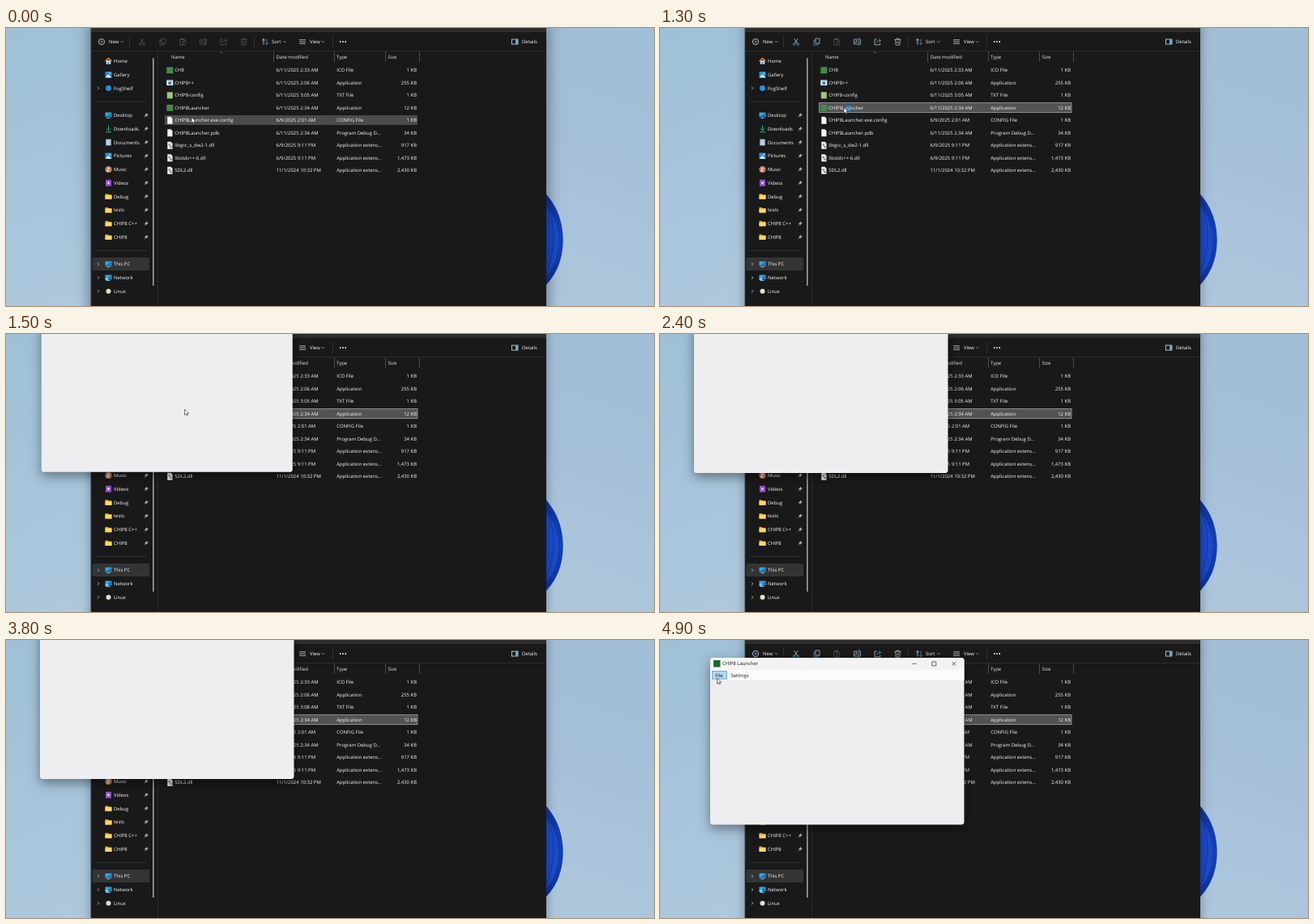
An HTML page with a canvas that plays this animation: 800 by 344 pixels, repeating every 5 s.

```html
<!DOCTYPE html>
<html lang="en">
<head>
<meta charset="utf-8">
<title>File list and launcher</title>
<style>
html, body { margin: 0; width: 100%; height: 100%; overflow: hidden; background: #a8c5d9; }
canvas { display: block; }
</style>
</head>
<body>
<canvas id="stage" width="800" height="344"></canvas>
<script>
const c = document.getElementById('stage').getContext('2d');
const LOOP = 5000, STEP = 100;
const LIGHT = '#fafafa', DIM = '#5c5c5c', BLUE = '#4cb4ec', CHROME = '#191919';

const files = [
  ['CH8', '6/11/2025 2:33 AM', 'ICO File', '1 KB', 'chip'],
  ['CHIP8++', '6/11/2025 2:06 AM', 'Application', '255 KB', 'app'],
  ['CHIP8-config', '6/11/2025 3:05 AM', 'TXT File', '1 KB', 'note'],
  ['CHIP8Launcher', '6/11/2025 2:34 AM', 'Application', '12 KB', 'chip'],
  ['CHIP8Launcher.exe.config', '6/9/2025 2:01 AM', 'CONFIG File', '1 KB', 'page'],
  ['CHIP8Launcher.pdb', '6/11/2025 2:34 AM', 'Program Debug D...', '34 KB', 'page'],
  ['libgcc_s_dw2-1.dll', '6/9/2025 9:11 PM', 'Application extens...', '917 KB', 'dll'],
  ['libstdc++-6.dll', '6/9/2025 9:11 PM', 'Application extens...', '1,473 KB', 'dll'],
  ['SDL2.dll', '11/1/2024 10:32 PM', 'Application extens...', '2,430 KB', 'dll']
];

// An empty label is a separator line.
const places = [
  ['Home', 'home'], ['Gallery', 'picture'], ['FogShelf', 'cloud'], [''],
  ['Desktop', 'desktop'], ['Downloads', 'download'], ['Documents', 'document'],
  ['Pictures', 'picture'], ['Music', 'music'], ['Videos', 'video'],
  ['Debug', 'folder'], ['tests', 'folder'], ['CHIP8 C++', 'folder'], ['CHIP8', 'folder'], [''],
  ['This PC', 'pc'], ['Network', 'network'], ['Linux', 'linux']
];

function rect(x, y, w, h, color, r = 0) {
  c.fillStyle = color;
  c.beginPath();
  c.roundRect(x, y, w, h, r);
  c.fill();
}
function frame(x, y, w, h, color, width = 0.7) {
  c.strokeStyle = color;
  c.lineWidth = width;
  c.strokeRect(x, y, w, h);
}
function dot(x, y, r, color) {
  c.fillStyle = color;
  c.beginPath();
  c.arc(x, y, r, 0, 7);
  c.fill();
}
function at(x, y, draw) {
  c.save();
  c.translate(x, y);
  draw();
  c.restore();
}
function line(d, color, width = 0.7) {
  c.strokeStyle = color;
  c.lineWidth = width;
  c.stroke(new Path2D(d));
}
function shape(d, color) {
  c.fillStyle = color;
  c.fill(new Path2D(d));
}
function text(s, x, y, color = LIGHT, align = 'left') {
  c.fillStyle = color;
  c.textAlign = align;
  c.fillText(s, x, y + 2.1);
}
function withShadow(blur, dy, alpha, draw) {
  c.save();
  c.shadowColor = `rgba(0,0,0,${alpha})`;
  c.shadowBlur = blur;
  c.shadowOffsetY = dy;
  draw();
  c.restore();
}
function gradient(x0, y0, x1, y1, ...colors) {
  const g = c.createLinearGradient(x0, y0, x1, y1);
  colors.forEach((color, i) => g.addColorStop(i / (colors.length - 1), color));
  return g;
}
const ease = p => p * p * (3 - 2 * p);
const clamp = v => Math.max(0, Math.min(1, v));

function follow(keys, t) {
  const i = keys.findIndex(k => k[0] > t);
  if (i < 0) return keys[keys.length - 1].slice(1);
  const [a, b] = [keys[i - 1], keys[i]];
  const p = (t - a[0]) / (b[0] - a[0]);
  return [a[1] + (b[1] - a[1]) * p, a[2] + (b[2] - a[2]) * p];
}

const page = () => {
  shape('M-3-4.5H1.2L3.2-2.5V4.5H-3Z', '#f4f4f4');
  shape('M1.2-4.5V-2.5H3.2Z', '#b5b5b5');
};
const monitor = () => {
  rect(-4, -3.4, 8, 5.6, '#35a6de', 0.6);
  shape('M-4 2.2L4-3.4V2.2Z', '#1c78bd');
  rect(-2, 3, 4, 0.9, '#a9c3d2');
};
const icons = {
  chip: () => rect(-4, -4, 8, 8, '#438a4b'),
  note: () => rect(-3.5, -4, 7, 8, '#9cc978'),
  cloud: () => dot(0, 0, 3.4, '#2391e0'),
  linux: () => dot(0, 0, 3, '#e4dfcd'),
  page,
  app() {
    rect(-4, -3.3, 8, 6.6, '#f2f5f8', 0.5);
    rect(-4, -3.3, 8, 1.3, '#9db9cc');
    rect(-2, -1.3, 4, 3.4, '#1f7fc9');
  },
  dll() {
    page();
    line('M-1.3-1.6h1.6v1.6h-1.6ZM.4 1h1.6v1.6H.4Z', '#77797c', 0.9);
  },
  home() {
    rect(-2.8, -0.8, 5.6, 4.6, '#d9dee3', 0.4);
    rect(-0.8, 1, 1.6, 2.8, '#2787cc');
    line('M-4 0L0-3.6L4 0', '#f08a45', 1.3);
  },
  picture() {
    rect(-4, -3.7, 8, 7.4, '#2b8edb', 0.8);
    shape('M-4 3.5L-.2-.4L4 3.7Z', '#d5efff');
    dot(1.8, -1.8, 0.8, '#fff');
  },
  desktop: monitor,
  pc: monitor,
  download: () => line('M0-4V2M-2.6-.4L0 2.2L2.6-.4M-3.5 4H3.5', '#26b57c', 1),
  document() {
    rect(-3.3, -4, 6.6, 8, '#9fb7cc', 0.6);
    line('M-1.8-1.6H1.8M-1.8.2H1.8M-1.8 2H1.8', '#f5f9fc', 0.8);
  },
  music() {
    dot(0, 0, 4, '#c9805f');
    line('M-.3 1.7V-2L1.6-1.3', '#fff', 0.8);
    dot(-1, 1.6, 0.9, '#fff');
  },
  video() {
    rect(-3.5, -4, 7, 8, '#9650d2', 0.8);
    shape('M-1-1.7L1.8 0L-1 1.7Z', '#fff');
  },
  folder() {
    shape('M-4-3.2H-.8L.2-2.2H4V3.2H-4Z', '#e9a928');
    rect(-4, -1.4, 8, 4.7, '#ffd667', 0.5);
  },
  network() {
    monitor();
    dot(-2, 1.8, 2, '#67cdf4');
  }
};

const chevron = (x, y, color = '#bdbdbd') => at(x, y, () => line('M-1.6-.8L0 .8L1.6-.8', color));

function background() {
  rect(0, 0, 400, 344, gradient(0, 0, 130, 344, '#9fc0d6', '#a6c4da', '#afc9de'));
  rect(400, 0, 400, 344, gradient(800, 0, 680, 344, '#a0bed6', '#a6c0d9', '#adc8dc'));
  shape('M660 199C679 215 688 239 687.700 264C687 289 679 307 660 325Z',
    gradient(660, 205, 688, 320, '#0d339c', '#1340b5', '#0d319d'));
  shape('M660 212C674 226 683 244 682 266C681 287 674 302 660 314Z', '#1b4bcb');
  line('M666 217C677 237 681 264 667 304', '#1039a6', 1);
}

function toolbar(active) {
  const ink = active ? '#d2d2d2' : DIM, accent = active ? BLUE : DIM;
  rect(105, 0, 562, 5, '#2d2d2d');
  line('M105 28.500H667', '#303030', 0.8);
  line('M152.500 10V24M306.500 10V24M403.500 10V24', '#363636', 0.8);
  at(118, 17, () => {
    line('M3.600 0A3.600 3.600 0 1 1-3.600 0A3.600 3.600 0 1 1 3.600 0', LIGHT);
    line('M-1.800 0H1.800M0-1.800V1.800', BLUE, 0.8);
  });
  text('New', 127, 17);
  at(168, 17, () => {
    line('M-2.300-4L1.500 2M2.300-4L-1.500 2', ink);
    line('M-1 3a1.300 1.300 0 1 1-2.600 0a1.300 1.300 0 1 1 2.600 0M3.600 3a1.300 1.300 0 1 1-2.600 0a1.300 1.300 0 1 1 2.600 0', accent);
  });
  at(193.5, 17, () => {
    line('M-1.500-4H3.500V2H-1.500Z', ink);
    line('M-1.500-2H-3.500V4H1.500V2', accent);
  });
  at(218, 17, () => line('M0 4H-3.300V-3H2.700V-1M-1.600-4H1V-2.500H-1.600ZM.3-.5H3.700V4H.3Z', DIM));
  at(243.5, 17, () => {
    line('M.8-3H-4V3H.8M3-3H4V3H3M-2.500 1.600L-1-1.600L.5 1.600', ink);
    line('M2-4V4M1-4H3M1 4H3', accent);
  });
  at(268.5, 17, () => {
    line('M-1-3H-3.500V3.800H3.300V1.500', ink);
    line('M-1.500 1.500C-1.200-.8 .5-1.600 3.800-1.600M1.600-4L4-1.600L1.600 .8', accent);
  });
  at(293.5, 17, () => line('M-4-2.700H4M-1.300-2.700V-4H1.300V-2.700M-3-2.700L-2.400 4H2.400L3-2.700M-.8-.6V2M.8-.6V2', ink));
  at(320, 17, () => {
    line('M-2 3.500V-3.500M-3.800-1.700L-2-3.500L-.2-1.700', LIGHT);
    line('M2-3.500V3.500M.2 1.700L2 3.500L3.800 1.700', BLUE);
  });
  text('Sort', 328, 17);
  at(366, 17, () => line('M-4-2.300H4M-4 0H4M-4 2.300H4', '#d0d0d0', 0.8));
  text('View', 375, 17);
  [143.5, 344, 391.5].forEach(x => chevron(x, 17));
  [-3.2, 0, 3.2].forEach(d => dot(416 + d, 17, 0.9, LIGHT));
  frame(624.5, 14, 7.5, 6, LIGHT);
  rect(629, 14, 3, 6, BLUE);
  text('Details', 637, 17);
}

function sidebar() {
  rect(106.5, 284, 70.5, 16, '#343434', 1.5);
  places.forEach(([label, icon], i) => {
    const y = 41 + 16.75 * i;
    if (!label) return rect(111, y - 0.5, 62, 0.8, '#3b3b3b');
    at(126.5, y, icons[icon]);
    text(label, 133, y);
    if (i === 2 || i > 14) at(114, y, () => line('M-.9-1.800L.9 0L-.9 1.800', '#c4c4c4', 0.8));
    if (i > 3 && i < 14) at(173, y, () => {
      shape('M.4-2.800L2.800-.4L1.600 .2L.2 2L-2 -.2L-.2-1.600Z', '#a5a5a5');
      line('M-.8 .8L-2.700 2.700', '#a5a5a5', 0.6);
    });
  });
  rect(181, 37, 1.7, 282, '#9b9b9b', 0.8);
  rect(187, 29, 0.8, 315, '#303030');
}

function fileList(t, hover, selected) {
  line('M330.500 29V42M405.500 29V42M468.500 29V42M510.500 29V42', '#505050', 0.9);
  at(265.5, 30.5, () => line('M-1.800 .8L0-.8L1.800 .8', '#888'));
  [['Name', 204], ['Date modified', 333.5], ['Type', 408], ['Size', 471.5]]
    .forEach(([s, x]) => text(s, x, 36, '#e6e6e6'));
  files.forEach(([name, date, type, size, icon], i) => {
    const y = 52.3 + 15.5 * i;
    if (i === 3 && selected) {
      rect(196, y - 6.3, 312, 12, '#535353');
      frame(196.5, y - 6.3, 311.5, 12, '#8c8c8c', 1);
    } else if (i === hover) rect(196, y - 6.3, 312, 12, '#4b4b4b');
    at(202.3, y, icons[icon]);
    text(name, 208.3, y);
    text(i === 2 && t >= 2900 ? date.replace('3:05', '3:08') : date, 333.5, y);
    text(type, 408.3, y);
    text(size, 507, y, LIGHT, 'right');
  });
}

function launcher(t, mouse) {
  if (t < 1400) return;
  const open = clamp((t - 1300) / 300), drag = ease(clamp((t - 3800) / 400));
  const scale = 1 - 0.3 * (1 - open) ** 3;
  const w = 313.5, h = 206.5;
  const x = 42 + 20 * drag, y = -34.5 + 56.5 * drag;
  const fileHover = t > 4300 && mouse[0] < x + 20.5 && mouse[1] > y + 16;
  at(x + w / 2, y + h / 2, () => {
    c.globalAlpha = t < 1500 ? 0.6 : 1;
    c.scale(scale, scale);
    c.translate(-w / 2, -h / 2);
    withShadow(14, 5, 0.42, () => rect(0, 0, w, h, '#eeeef0', 3.5));
    rect(0, 0, w, 15, '#f3f3f3', [3.5, 3.5, 0, 0]);
    rect(0, 15, w, 13, '#fbfbfb');
    rect(4, 3, 8.5, 8.5, '#1f6a2a');
    text('CHIP8 Launcher', 15, 7.2, '#1a1a1a');
    line('M249.500 7.400H254.500M273.800 4.900H278.800V9.900H273.800ZM298.300 4.900L303.300 9.900M303.300 4.900L298.300 9.900', '#222');
    if (fileHover) {
      rect(2, 16.3, 18.5, 10, '#b5d8f2');
      frame(2.3, 16.6, 18, 9.6, '#3f98d8');
    }
    text('File', 6.2, 21.4, '#111');
    text('Settings', 25.5, 21.4, '#111');
  });
}

const route = [
  [0, 229, 110.5], [100, 229, 110], [300, 227, 98.5], [1300, 227, 98.5],
  [1400, 226, 98], [1500, 220.5, 93], [1700, 196, 35], [1900, 180, -15], [3800, 180, -28],
  [4200, 200, 28], [4300, 195, 30], [4700, 80, 46], [4900, 70.5, 47]
];

function pointer([x, y], busy) {
  at(x, y, () => {
    const d = 'M0 0V7.200L1.700 5.600L2.800 8.100L4 7.600L2.900 5.100H5.100Z';
    shape(d, '#fff');
    line(d, '#1b1b1b', 0.6);
    if (busy) line('M9.200 .8A2.700 2.700 0 1 1 3.800 .8A2.700 2.700 0 1 1 9.200 .8', '#1b8fe0', 1.5);
  });
}

function draw(t) {
  const mouse = follow(route, t);
  const selected = t >= 400, focused = t < 900;
  c.font = '5.95px "Open Sans", "Noto Sans", sans-serif';
  c.textRendering = 'geometricPrecision';
  background();
  withShadow(focused ? 18 : 12, 3, focused ? 0.5 : 0.35, () => rect(105, -10, 562, 370, CHROME));
  toolbar(selected);
  sidebar();
  fileList(t, t < 1400 ? Math.round((mouse[1] - 50.5) / 15.5) : -1, selected);
  rect(104.5, 0, 0.7, 344, '#4a4f53');
  launcher(t, mouse);
  pointer(mouse, t >= 900 && t < 1400);
}

function tick(now) {
  draw(Math.floor(now % LOOP / STEP) * STEP);
  requestAnimationFrame(tick);
}
requestAnimationFrame(tick);
</script>
</body>
</html>
```
